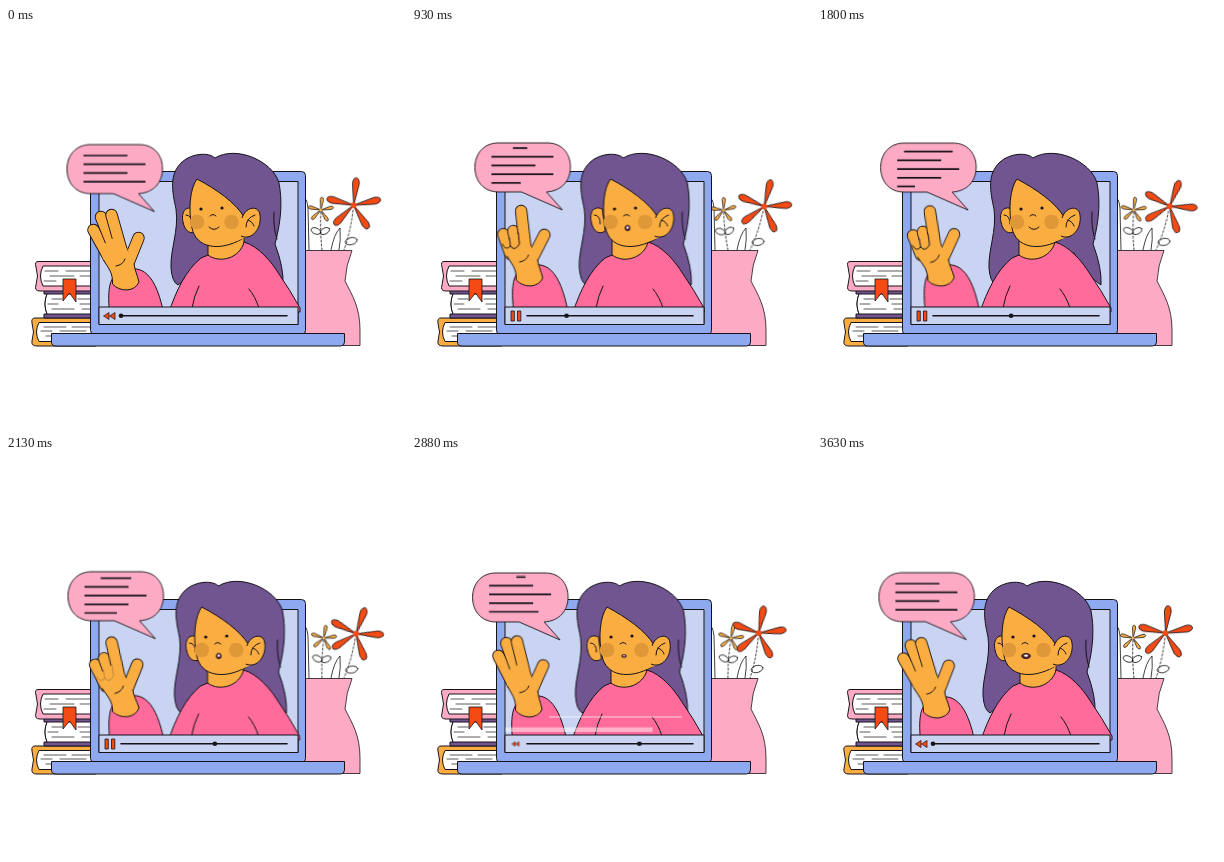
These frames come from a looping animation (400 px wide and 400 px high, 3.66 s). An HTML page without scripts:

```html
<!DOCTYPE html>
<html lang="en">
<head>
<meta charset="utf-8">
<title>Video lesson</title>
<style>
  html, body { margin: 0; width: 100%; height: 100%; overflow: hidden; background: #fff; }
  svg { display: block; width: 100vw; height: 100vh; }

  svg { --ink: #161218; --skin: #faae42; --hair: #705591; --pink: #fdaac5; --red: #f44a14; }
  .line { fill: none; stroke: var(--ink); stroke-linecap: round; stroke-linejoin: round; }
  .shape { stroke: var(--ink); stroke-linejoin: round; }
  .pink { fill: var(--pink); } .hair { fill: var(--hair); } .skin { fill: var(--skin); }
  .shirt { fill: #ff6b9a; } .red { fill: var(--red); } .blue { fill: #8ea9f0; }
  .screen { fill: #c9d4f3; } .white { fill: #fff; } .ink { fill: var(--ink); }

  /* one full loop */
  .head, .face, .body, .arm, .hand, .dot, .rewind, .pause, .glitch, .scroll,
  .leave1, .leave2, .enter1, .enter2, .eyes, .lids, .smile, .open, .talk, .finger, .curl {
    animation: 3.66s ease-in-out infinite;
  }
  .scroll, .leave1, .leave2, .enter1, .enter2, .dot, .glitch { animation-timing-function: linear; }
  .eyes, .lids, .smile, .open { animation-timing-function: step-end; }

  /* slow swaying, there and back once per loop */
  .bubble, .bloom, .spin, .bud { animation: 1.83s ease-in-out infinite alternate; }
  .bubble { animation-name: drift; animation-delay: -.54s; }
  .bloom { animation-name: bloom; animation-delay: -.54s; transform-origin: 338px 222px; }
  .spin { animation-name: spin; animation-delay: -3.39s; transform-origin: 346.5px 177px; }
  .bud { animation-name: bud; animation-delay: -.99s; transform-origin: 316px 222px; }
  @keyframes drift { from { transform: translate(0, 0); } to { transform: translate(2.6px, -2.3px); } }
  @keyframes bloom { from { transform: rotate(0deg); } to { transform: rotate(8deg); } }
  @keyframes spin { from { transform: rotate(-2deg); } to { transform: rotate(9deg); } }
  @keyframes bud { from { transform: rotate(6deg); } to { transform: rotate(-5deg); } }

  /* text in the bubble */
  .scroll { animation-name: scroll; }
  .text { stroke: var(--ink); stroke-width: 1.7; }
  .leave1, .leave2 { transform-origin: 109px 0; }
  .enter1, .enter2 { transform-origin: 77px 0; }
  .leave1 { animation-name: leave1; } .leave2 { animation-name: leave2; }
  .enter1 { animation-name: enter1; } .enter2 { animation-name: enter2; }
  @keyframes scroll { 0%, 98.4%, 100% { transform: translateY(0); } 76.5% { transform: translateY(-17.4px); } }
  @keyframes leave1 { 0%, 4.4%, 97.1%, 100% { transform: scaleX(1); } 35.6%, 88.2% { transform: scaleX(0); } }
  @keyframes leave2 { 0%, 42.6%, 86.2%, 100% { transform: scaleX(1); } 73.4%, 77.4% { transform: scaleX(0); } }
  @keyframes enter1 { 0%, 98.4%, 100% { transform: scaleX(0); } 38.2%, 87.4% { transform: scaleX(1); } }
  @keyframes enter2 { 0%, 38.2%, 87.4%, 100% { transform: scaleX(0); } 76.5% { transform: scaleX(1); } }

  /* player */
  .dot { animation-name: seek; }
  .rewind { animation-name: rewind; transform-origin: 103.5px 288px; }
  .pause { animation-name: pause; transform-origin: 104px 288px; }
  .glitch { animation-name: glitch; fill: #fff; }
  @keyframes seek {
    0%, 98.4%, 100% { transform: translateX(0); }
    15.6% { transform: translateX(24px); }
    35.2% { transform: translateX(55px); }
    49.2% { transform: translateX(78px); }
    67.2% { transform: translateX(109.5px); }
    76.5% { transform: translateX(125px); }
  }
  @keyframes rewind { 0%, 1%, 81%, 100% { transform: scale(1); } 4%, 75.5% { transform: scale(0); } }
  @keyframes pause { 0%, 3%, 76%, 100% { transform: scale(0); } 7%, 72% { transform: scale(1); } }
  @keyframes glitch {
    0%, 76.5% { transform: translateY(5px); opacity: 0; }
    76.6% { transform: translateY(5px); opacity: .5; }
    78.7% { transform: translateY(0); opacity: .5; }
    98.3% { transform: translateY(-105px); opacity: .5; }
    98.4%, 100% { transform: translateY(-105px); opacity: 0; }
  }

  /* girl */
  .head { animation-name: head; } .face { animation-name: face; } .body { animation-name: body; }
  @keyframes head {
    0%, 99.2%, 100% { transform: translateX(0); }
    15.6%, 78.7% { transform: translateX(-1.5px); }
    35.2%, 49.2% { transform: translateX(6px); }
    67.2% { transform: translateX(1px); }
  }
  @keyframes face {
    0%, 99.2%, 100% { transform: translateX(0); }
    15.6% { transform: translateX(5px); }
    35.2% { transform: translateX(10px); }
    49.2% { transform: translateX(8px); }
    67.2% { transform: translateX(1.5px); }
    78.7% { transform: translateX(4px); }
  }
  @keyframes body {
    0%, 67.2%, 99.2%, 100% { transform: translateX(0); }
    15.6%, 78.7% { transform: translateX(-3px); }
    35.2%, 49.2% { transform: translateX(-1px); }
  }
  .eyes { animation-name: eyes; } .lids { animation-name: lids; }
  @keyframes eyes { 0%, 18%, 100% { opacity: 1; } 14% { opacity: 0; } }
  @keyframes lids { 0%, 18%, 100% { opacity: 0; } 14% { opacity: 1; } }
  .smile { animation-name: smile; } .open { animation-name: open; }
  @keyframes smile { 0%, 28% { opacity: 1; } 5%, 52%, 100% { opacity: 0; } }
  @keyframes open { 0%, 28% { opacity: 0; } 5%, 52%, 100% { opacity: 1; } }
  .talk { animation-name: talk; transform-origin: 208px 200px; }
  @keyframes talk {
    0%, 99.2%, 100% { transform: scale(1.35, .75); }
    15.6%, 67.2% { transform: scale(.8); }
    78.7% { transform: scale(.8, .45); }
  }

  /* waving hand */
  .arm { animation-name: arm; }
  .hand { animation-name: hand; transform-origin: 120px 257px; }
  @keyframes arm {
    0%, 100% { transform: translate(0, 0); }
    15.6% { transform: translate(-4.5px, -2px); }
    35.2% { transform: translate(0, -6px); }
    49.2% { transform: translate(3.5px, -4px); }
    67.2% { transform: translate(-3px, 1.5px); }
    78.7% { transform: translate(-3px, -1px); }
    99.2% { transform: translate(-1px, 0); }
  }
  @keyframes hand {
    0%, 35.2%, 100% { transform: rotate(0deg); }
    15.6%, 99.2% { transform: rotate(-1deg); }
    49.2% { transform: rotate(-3deg); }
    67.2% { transform: rotate(-5deg); }
    78.7% { transform: rotate(2deg); }
  }
  .finger { fill: none; stroke: var(--skin); stroke-width: 10.6; stroke-linecap: round; }
  .edge { stroke: var(--ink); stroke-width: 12.4; }
  .outer { d: path("M103 230L87.5 202"); animation-name: outer; }
  .middle { d: path("M110 226L95 189"); animation-name: middle; }
  .index { d: path("M116 224L105.5 187"); animation-name: index; }
  .thumb { d: path("M122 236L132.5 210"); animation-name: thumb; }
  @keyframes outer {
    0%, 15%, 64%, 100% { d: path("M103 230L87.5 202"); }
    25%, 55% { d: path("M101 230L94 210"); }
  }
  @keyframes middle {
    0%, 15%, 64%, 100% { d: path("M110 226L95 189"); }
    25%, 55% { d: path("M109 228L104 207"); }
  }
  @keyframes index {
    0%, 15%, 64%, 100% { d: path("M116 224L105.5 187"); }
    25%, 55% { d: path("M116 224L112 187"); }
  }
  @keyframes thumb {
    0%, 15%, 64%, 100% { d: path("M122 236L132.5 210"); }
    25%, 55% { d: path("M122 236L135 211"); }
  }
  .curl { animation-name: curl; }
  @keyframes curl { 0%, 20%, 60%, 100% { opacity: 0; } 25%, 55% { opacity: 1; } }
</style>
</head>
<body>
<svg viewBox="0 0 400 400">
  <defs>
    <path id="petal" d="M0 0L-3.400 -22Q-3 -27.500 0 -27.500Q3 -27.500 3.400 -22Z"/>
    <g id="flower">
      <use href="#petal" transform="rotate(6)"/>
      <use href="#petal" transform="rotate(78)"/>
      <use href="#petal" transform="rotate(148)"/>
      <use href="#petal" transform="rotate(225)"/>
      <use href="#petal" transform="rotate(284)"/>
      <circle r="3" stroke="none"/>
    </g>
  </defs>

  <!-- plants and vase -->
  <g class="line" stroke-width=".8">
    <path d="M299 222V176Q300 166 302 180L303 222M325 222Q328 206 334 200Q335 212 333 222"/>
    <g class="bloom">
      <path d="M346 182Q344 204 338 222" stroke-dasharray="2 2"/>
      <ellipse cx="345" cy="213" rx="6" ry="3.5" transform="rotate(-15 345 213)"/>
      <g class="spin"><use href="#flower" class="red" transform="translate(346.500 177)"/></g>
    </g>
    <g class="bud">
      <path d="M315 184Q314 204 316 222" stroke-dasharray="2 2"/>
      <ellipse cx="310" cy="203" rx="5" ry="3" transform="rotate(22 310 203)"/>
      <ellipse cx="319" cy="203" rx="5" ry="3" transform="rotate(-28 319 203)"/>
      <use href="#flower" class="skin" stroke-width="1.500" transform="translate(315 182) scale(.47)"/>
    </g>
  </g>
  <path class="shape pink" stroke-width=".8" d="M290 222.500H346Q340 237 339 253C346 267 354 279 354 302V317.500H290Z"/>

  <!-- books -->
  <g class="shape" stroke-width="1">
    <path fill="#faae42" d="M90 290H29Q25 290 26 295Q29 304 26 313Q25 318 31 318H90Z"/>
    <path class="white" d="M90 294.500H33Q28 304 33 313.500H90Z"/>
    <path class="hair" d="M90 262H38V266H41Q37 276 41 286H38V290H90Z"/>
    <path class="white" d="M90 266H41Q37 276 41 286H90Z"/>
    <path class="pink" d="M90 233.500H33Q28 233 30 239Q33 248 30 257Q28 263 34 263H90Z"/>
    <path class="white" d="M90 238H37Q32 248 37 258H90Z"/>
  </g>
  <path class="line" stroke-width=".7" d="M39 243H52M60 243H85M44 248H68M74 248H85M38 253H50M46 271H56M72 271H85M42 276H52M74 276H85M46 281H68M76 281H85M38 299H60M66 299H85M35 303H46M54 303H80M40 308H70"/>
  <path class="shape red" stroke-width=".8" d="M57 251H70V274L63.500 265L57 273Z"/>

  <!-- laptop -->
  <g class="shape" stroke-width="1">
    <rect class="blue" x="84.500" y="143.500" width="215" height="163" rx="4"/>
    <rect class="screen" x="93" y="153.500" width="199" height="143"/>
  </g>

  <!-- girl -->
  <g class="head shape" stroke-width="1">
    <path class="hair" d="M209 130C203 124 186 125 176 134C163 146 166 163 170 181C173 203 164 222 165 240Q166 254 172 257Q190 244 200 230L250 225Q261 247 277 257Q278 240 269 216C276 190 276 171 273 155C267 133 230 117 209 130Z"/>
    <path class="line" d="M268 184Q267 199 271 211"/>
  </g>
  <g class="body shape" stroke-width="1">
    <path class="skin" d="M202 205V230Q222 242 238 224V200Z"/>
    <path class="shirt" d="M163 284C170 263 180 242 195 230L202 227C214 236 234 230 238 214C252 218 265 233 273 246Q284 262 294 280V284Z"/>
    <path class="line" d="M193 258Q188 268 186 280M243 261Q249 268 253 280"/>
  </g>
  <g class="head shape skin" stroke-width="1">
    <path d="M188 181C179 177 175 185 177 194C179 204 185 207 191 203Z"/>
    <path class="line" d="M180 187Q186 187 186 196"/>
  </g>
  <g class="face shape skin" stroke-width="1">
    <path d="M191 151C184 160 182 182 186 200C190 220 213 224 236 211L245 190L238 189C230 175 210 161 191 151Z"/>
    <path stroke="none" d="M228 188L248 188V206L231 213Z"/>
    <path d="M236 190C240 178 253 177 254 187C256 200 246 213 235 208"/>
    <path class="line" d="M249 187Q240 190 240 199M242 192Q247 194 248 198"/>
    <g fill="#df9838" stroke="none"><circle cx="191" cy="194" r="7.300"/><circle cx="225.500" cy="194" r="7.300"/></g>
    <path class="line" d="M204 188Q207 185 210 188"/>
    <g class="eyes ink" stroke="none"><circle cx="195" cy="181" r="1.600"/><circle cx="216" cy="180" r="1.600"/></g>
    <path class="lids line" d="M193 181Q196 183 199 181M214 181Q217 183 220 181"/>
    <path class="smile line" d="M203 199Q208 204 213 199"/>
    <g class="open"><g class="talk">
      <ellipse fill="#5a2036" cx="208" cy="200" rx="3" ry="3.400"/>
      <ellipse fill="#fff" stroke="none" cx="208" cy="199.500" rx="1.500" ry="1.500"/>
    </g></g>
  </g>
  <path class="arm shape shirt" stroke-width="1" d="M104 290C101 262 103 249 113 245C132 235 148 241 157 282V290Z"/>

  <!-- player bar -->
  <g class="glitch">
    <rect x="137" y="260.300" width="133" height="1.400"/>
    <rect x="93.500" y="271.500" width="147" height="4.500"/>
  </g>
  <rect class="shape screen" stroke-width="1" x="93" y="279" width="199" height="17.500"/>
  <path class="line" stroke-width="1.600" d="M115 287.700H281"/>
  <circle class="dot ink" cx="115" cy="287.700" r="2.300"/>
  <path class="rewind shape red" stroke-width=".7" d="M97.500 288L103 284.500V291.500ZM103.500 288L109 284.500V291.500Z"/>
  <path class="pause shape red" stroke-width=".8" d="M99 283H102.300V293H99ZM105.500 283H108.800V293H105.500Z"/>
  <path class="shape blue" stroke-width="1" d="M45.500 305.500H338.500V314Q338.500 318 334.500 318H50Q45.500 318 45.500 314Z"/>

  <!-- hand -->
  <g class="arm"><g class="hand">
    <path class="finger edge thumb"/><path class="finger thumb"/>
    <path class="finger edge outer"/><path class="finger outer"/>
    <path class="finger edge middle"/><path class="finger middle"/>
    <path class="finger edge index"/><path class="finger index"/>
    <path class="skin" d="M97.500 232C102 240 107 244 106.500 256Q112 262 121 262Q130 261 133 254C131 246 129 243 128 236L121 221L112 208L102 213L94 220Z"/>
    <path class="line" stroke-width="1" d="M97.500 232C102 240 107 244 106.500 256Q112 262 121 262Q130 261 133 254C131 246 129 243 128 236M110 238Q117 237 119 231"/>
    <path class="curl line" stroke-width="1" d="M93 220Q96 227 101 222L100 214M101 222Q105 228 110 220L109 209"/>
  </g></g>

  <!-- speech bubble -->
  <g class="bubble">
    <path class="shape pink" stroke-width=".9" d="M84 117H133C148 117 156 128 156 141C156 154 148 165 132 166L148 184L107 166H84C69 166 60.500 155 60.500 141.500C60.500 128 69 117 84 117Z"/>
    <g class="scroll text">
      <path class="leave1" d="M77 128H121"/>
      <path class="leave2" d="M77 136.700H139"/>
      <path d="M77 145.400H121M77 154.100H139"/>
      <path class="enter1" d="M77 162.800H121"/>
      <path class="enter2" d="M77 171.500H139"/>
    </g>
  </g>
</svg>
</body>
</html>
```
